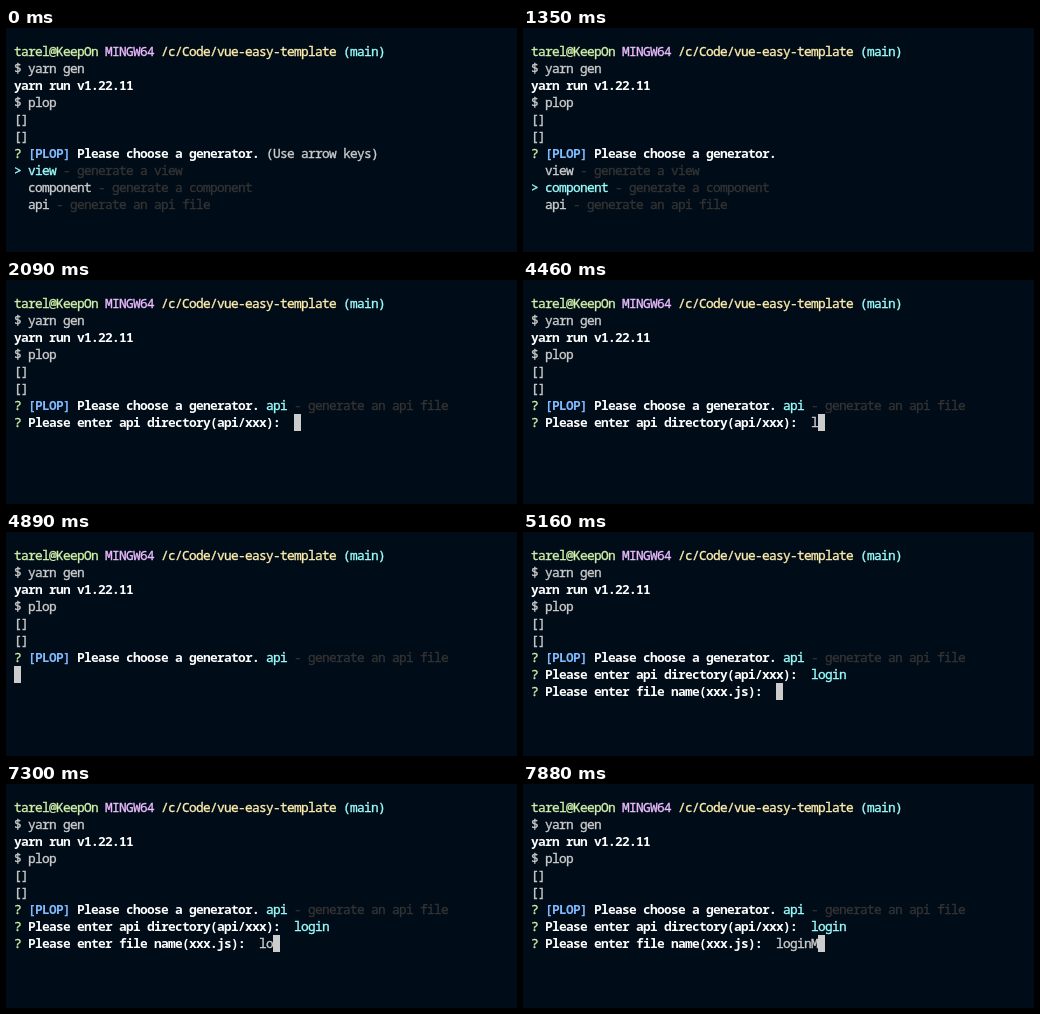
Write an HTML page that moves like this. It is 511 px wide and 224 px high and loops after 8000 ms.

```html
<!DOCTYPE html>
<html lang="en">
<head>
<meta charset="utf-8">
<title>Generator prompt</title>
<style>
  html, body { margin: 0; width: 100%; height: 100%; overflow: hidden; background: #000c18; }
  svg { display: block; }
  /* Glyphs are a little wider than their 7px cell, so the text sets tight */
  text {
    font: 12.8px "Noto Sans Mono", "DejaVu Sans Mono", monospace;
    letter-spacing: calc(7px - .6em);
    white-space: pre;
    fill: currentColor;
  }
  .plain { stroke: currentColor; stroke-width: .35px; }
  .bold { font-weight: 700; }
</style>
</head>
<body>
<svg id="term" width="511" height="224" viewBox="0 0 511 224"></svg>
<script>
const LOOP = 8000, LEFT = 8, TOP = 15, CELL = 7, ROW = 17, BASE = 13;
const C = {
  fg: '#cccccc', white: '#ffffff', green: '#d1f1a9', magenta: '#ebbbff',
  yellow: '#ffeead', cyan: '#99ffff', blue: '#80baff', dim: '#333333'
};
const term = document.getElementById('term');

const span = (text, color = 'fg', weight = 'plain') => ({ text, color, weight });
const cursor = { cursor: true };
const bold = (text, color = 'white') => span(text, color, 'bold');
const mark = span('? ', 'green');

const header = [
  [span('tarel@KeepOn ', 'green'), span('MINGW64 ', 'magenta'),
   span('/c/Code/vue-easy-template ', 'yellow'), span('(main)', 'cyan')],
  [span('$ yarn gen')],
  [bold('yarn run v1.22.11')],
  [span('$ plop')],
  [span('[]')],
  [span('[]')]
];
const choices = [
  ['view', 'generate a view'],
  ['component', 'generate a component'],
  ['api', 'generate an api file']
];
const choose = [mark, bold('[PLOP] ', 'blue'), bold('Please choose a generator. ')];
const chosen = [...choose, span('api', 'cyan'), span(' - generate an api file', 'dim')];
const askDir = [mark, bold('Please enter api directory(api/xxx):  ')];
const askFile = [mark, bold('Please enter file name(xxx.js):  ')];
const dirDone = [...askDir, span('login', 'cyan')];

const menu = (index, hint = '') => [
  [...choose, span(hint)],
  ...choices.map(([name, about], i) => [
    span(i === index ? '> ' : '  ', 'cyan'),
    span(name, i === index ? 'cyan' : 'fg'),
    span(' - ' + about, 'dim')
  ])
];
const typing = (ask, text) => [...ask, span(text), cursor];
const dir = text => [chosen, typing(askDir, text)];
const file = text => [chosen, dirDone, typing(askFile, text)];

// Start time in ms and the rows below the header
const steps = [
  [0, menu(0, '(Use arrow keys)')],
  [1350, menu(1)],
  [1640, menu(2)],
  [2090, dir('')],
  [4460, dir('l')],
  [4740, dir('log')],
  [4890, [chosen, [cursor]]],
  [5010, dir('login')],
  [5160, file('')],
  [7000, [chosen, dirDone, [cursor]]],
  [7150, file('l')],
  [7300, file('lo')],
  [7430, file('logi')],
  [7580, file('login')],
  [7880, file('loginM')]
];

function add(tag, attrs, text = '') {
  const el = document.createElementNS(term.namespaceURI, tag);
  for (const key in attrs) el.setAttribute(key, attrs[key]);
  el.textContent = text;
  term.appendChild(el);
}

function drawRow(spans, row) {
  const y = TOP + row * ROW;
  let x = LEFT;
  for (const s of spans) {
    if (s.cursor) {
      add('rect', { x, y, width: CELL, height: ROW, fill: C.fg });
      continue;
    }
    // Each word starts on the cell grid
    for (const w of s.text.matchAll(/\S+/g)) {
      add('text', {
        x: x + w.index * CELL, y: y + BASE, color: C[s.color], class: s.weight
      }, w[0]);
    }
    x += s.text.length * CELL;
  }
}

let shown = null;
function render(time) {
  const rows = steps.findLast(([start]) => start <= time)[1];
  if (rows === shown) return;
  shown = rows;
  term.replaceChildren();
  add('rect', { width: 511, height: 224, fill: '#000c18' });
  [...header, ...rows].forEach(drawRow);
}

const began = performance.now();
function tick() {
  render((performance.now() - began) % LOOP);
  requestAnimationFrame(tick);
}
tick();
</script>
</body>
</html>
```
